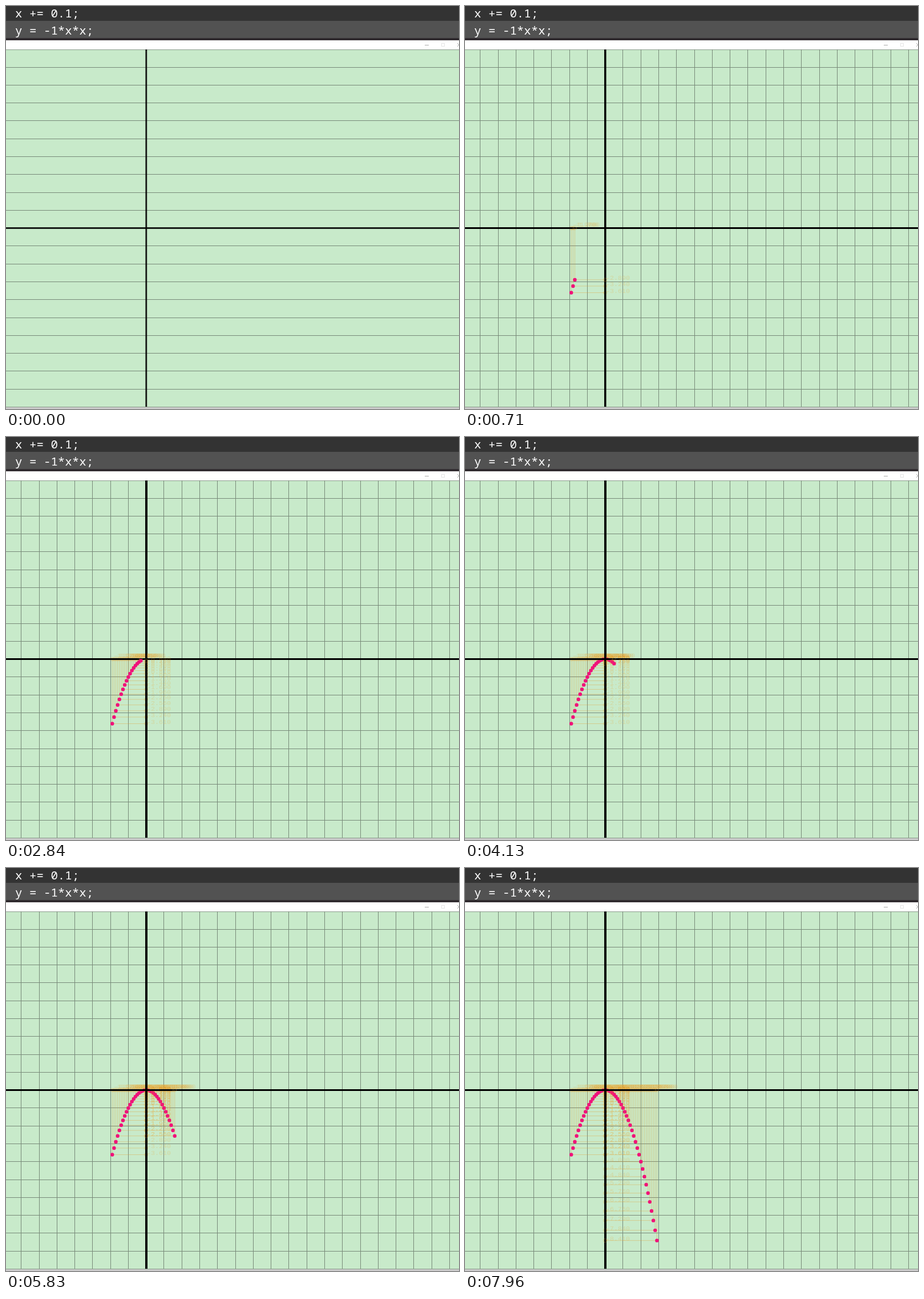
These frames come from a looping animation (794x705 px, 8140 ms). An HTML page with a canvas:

```html
<!DOCTYPE html>
<html lang="en">
<head>
<meta charset="utf-8">
<title>Plotting y = -x²</title>
<style>
  html, body { margin: 0; width: 100%; height: 100%; overflow: hidden; }
  canvas { display: block; }
</style>
</head>
<body>
<canvas id="stage" width="794" height="705"></canvas>
<script>
const ctx = document.getElementById('stage').getContext('2d');
const LOOP = 8140, W = 794, TOP = 76, BOTTOM = 701;
const OX = 245.7, OY = 388.6, UNIT = 31.28;

// [point count, time in ms]; counts in between are spaced evenly
const PACE = [
  [1, 220], [2, 530], [4, 890], [8, 1440], [9, 1620], [10, 1750], [11, 1930],
  [16, 2660], [17, 2840], [23, 3820], [24, 4000], [25, 4130], [26, 4310],
  [31, 5030], [32, 5210], [36, 5830], [39, 6370], [43, 6980], [44, 7230],
  [46, 7590], [49, 7960]
];

function pointCount(time) {
  if (time < PACE[0][1]) return 0;
  const next = PACE.findIndex(p => p[1] > time);
  if (next < 0) return 49;
  const [n0, t0] = PACE[next - 1], [n1, t1] = PACE[next];
  return Math.floor(n0 + (n1 - n0) * (time - t0) / (t1 - t0) + 1e-6);
}

function rect(color, x, y, w, h) {
  ctx.fillStyle = color;
  ctx.fillRect(x, y, w, h);
}

function line(x1, y1, x2, y2) {
  ctx.beginPath();
  ctx.moveTo(x1, y1);
  ctx.lineTo(x2, y2);
  ctx.stroke();
}

function circle(x, y, r) {
  ctx.beginPath();
  ctx.arc(x, y, r, 0, 2 * Math.PI);
}

function drawWindow() {
  rect('#333', 0, 0, W, 26);
  rect('#525252', 0, 26, W, 30);
  rect('#302b2f', 0, 56, W, 4);
  rect('#fff', 0, 60, W, 16);
  ctx.font = '20.8px "Noto Sans Mono", monospace';
  ctx.fillStyle = '#fff';
  ctx.fillText('x += 0.1;', 16, 20);
  ctx.fillText('y = -1*x*x;', 16, 50);

  ctx.lineWidth = 1;
  ctx.strokeStyle = '#aaa';
  line(734, 68.5, 741, 68.5);
  line(791, 65, 797, 71);
  line(791, 71, 797, 65);
  ctx.strokeStyle = '#e4e4e4';
  ctx.strokeRect(763.5, 65.5, 5, 5);

  rect('#c8eaca', 0, TOP, W, BOTTOM - TOP);
  rect('#8c9c8d', 0, TOP, W, 1);
  rect('#8c9c8d', 0, BOTTOM, W, 1);
  rect('#cbcbcb', 0, BOTTOM + 1, W, 3);
}

function drawGrid(vertical) {
  ctx.lineWidth = 1;
  ctx.strokeStyle = '#788a79';
  for (let i = -9; i <= 9; i++) {
    const y = Math.floor(OY + i * UNIT) + 0.5;
    line(0, y, W, y);
  }
  if (!vertical) return;
  for (let i = -7; i <= 17; i++) {
    const x = Math.floor(OX + i * UNIT) + 0.5;
    line(x, TOP, x, BOTTOM);
  }
}

function drawAxes() {
  rect('rgba(0,0,0,.86)', 0, 387, W, 3);
  rect('rgba(0,0,0,.9)', 244.4, TOP, 2.8, BOTTOM - TOP);
}

function drawPoint(index) {
  const x = (index - 19) / 10, y = -x * x;
  const px = OX + x * UNIT, py = OY - y * UNIT;
  ctx.lineWidth = 0.8;
  ctx.strokeStyle = 'rgba(225,155,45,.48)';
  line(px, OY, px, py);
  line(OX, py, px, py);
  for (const [cx, cy] of [[px, OY], [OX, py]]) {
    circle(cx, cy, 3);
    ctx.stroke();
  }
  ctx.font = '11.7px "Liberation Mono", monospace';
  ctx.fillStyle = 'rgba(240,165,40,.25)';
  ctx.fillText(x.toFixed(3), px + 1.7, 385.5);
  ctx.fillText(y.toFixed(3), OX + 1.2, py);
  ctx.fillStyle = '#f0127a';
  circle(px, py, 3.2);
  ctx.fill();
}

function render(now) {
  const count = pointCount(now % LOOP);
  drawWindow();
  drawGrid(count > 0);
  drawAxes();
  for (let i = 0; i < count; i++) {
    drawAxes();
    drawPoint(i);
  }
}

const start = performance.now();
function tick() {
  render(performance.now() - start);
  requestAnimationFrame(tick);
}
tick();
</script>
</body>
</html>
```
